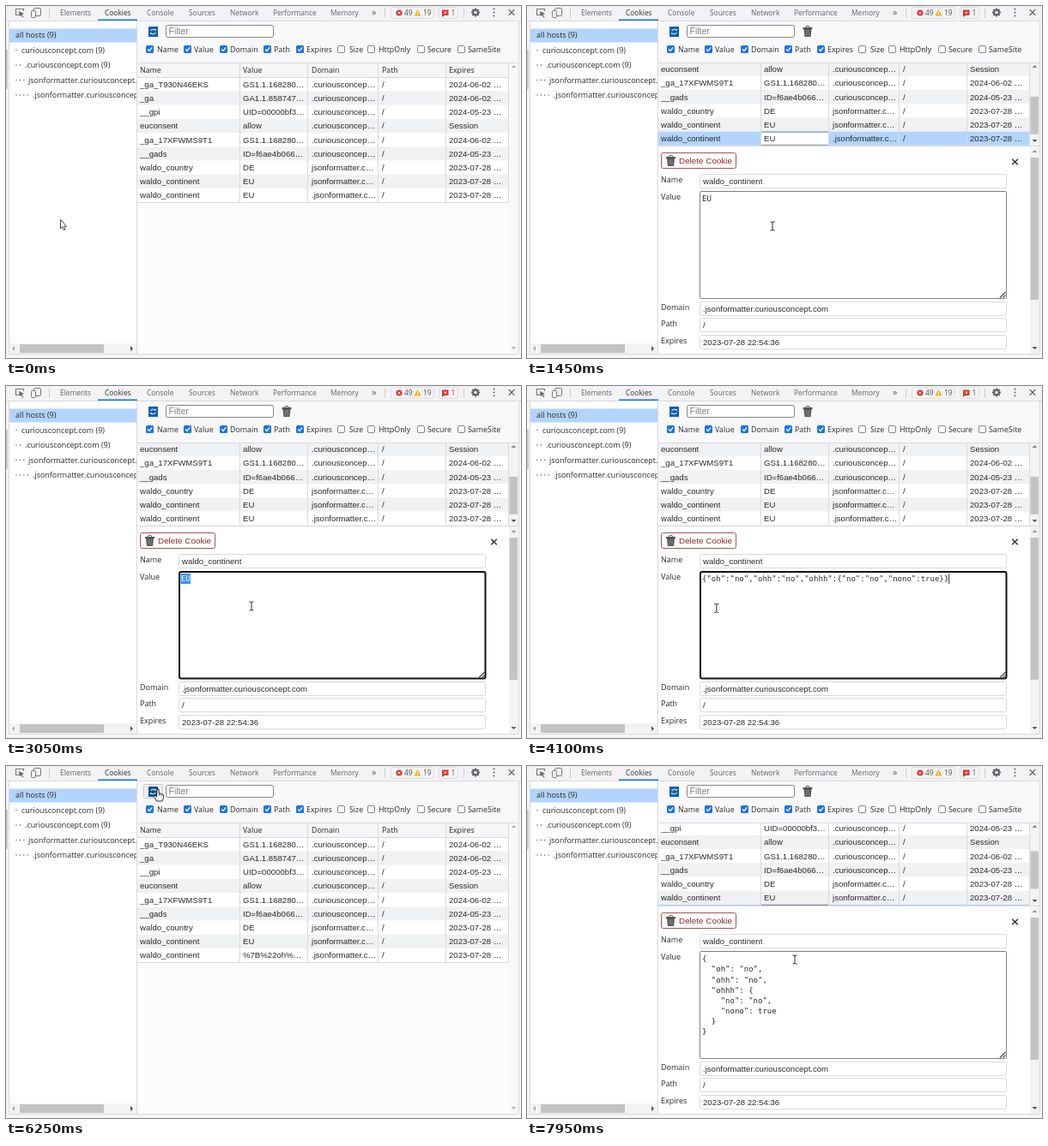
Animation of 600x411 px, one loop 8000 ms. Source, as an HTML page with a canvas:

```html
<!DOCTYPE html>
<html lang="en">
<head>
<meta charset="utf-8">
<title>Cookie editor</title>
<style>
html, body { margin: 0; width: 100%; height: 100%; overflow: hidden; background: #fff; }
canvas { display: block; width: 600px; height: 411px; }
</style>
</head>
<body>
<canvas id="stage"></canvas>
<script>
const canvas = document.getElementById('stage');
const ctx = canvas.getContext('2d');
const ratio = window.devicePixelRatio || 1;
canvas.width = 600 * ratio;
canvas.height = 411 * ratio;
ctx.scale(ratio, ratio);

const LOOP = 8000;
const UI = '"Open Sans", sans-serif';
const SANS = '"Liberation Sans", Arial, sans-serif';
const MONO = '"DejaVu Sans Mono", monospace';
const SELECTED = '#b3d4fc', BLUE = '#1a73e8', INK = '#2a2a2a', RULE = '#d8dade';
const ROW = 16.2, ROWS_TOP = 83.3, MAX_SCROLL = 66.3;
const COLUMNS = [156, 276, 356, 438, 516];
const HEADS = ['Name', 'Value', 'Domain', 'Path', 'Expires'];
const HOST = '.curiousconcep…', JSON_HOST = 'jsonformatter.c…';
const COOKIES = [
  ['_ga_T930N46EKS', 'GS1.1.168280…', HOST, '2024-06-02 …'],
  ['_ga', 'GA1.1.858747…', HOST, '2024-06-02 …'],
  ['__gpi', 'UID=00000bf3…', HOST, '2024-05-23 …'],
  ['euconsent', 'allow', HOST, 'Session'],
  ['_ga_17XFWMS9T1', 'GS1.1.168280…', HOST, '2024-06-02 …'],
  ['__gads', 'ID=f6ae4b066…', HOST, '2024-05-23 …'],
  ['waldo_country', 'DE', JSON_HOST, '2023-07-28 …'],
  ['waldo_continent', 'EU', JSON_HOST, '2023-07-28 …'],
  ['waldo_continent', 'EU', '.' + JSON_HOST, '2023-07-28 …']
];
const DATA = { oh: 'no', ohh: 'no', ohhh: { no: 'no', nono: true } };

// Moments of the story, in ms
const OPEN = 750, FOCUS = 1900, SELECT = 2700, PASTE = 3550, CLOSE = 4600, REOPEN = 7700;
const PATH = [
  [50, 63, 249], [700, 324, 226], [900, 324, 226], [1400, 286, 257], [3850, 286, 257],
  [4200, 205, 260], [4600, 107, 277], [4800, 107, 277], [5050, 128, 237],
  [5900, 172, 38], [6150, 177, 27], [6450, 177, 27], [7200, 295, 193], [7500, 312, 226]
];

const clamp = v => Math.max(0, Math.min(1, v));
const smooth = v => { v = clamp(v); return v * v * (3 - 2 * v); };

function pointer(t) {
  let from = PATH[0];
  for (const to of PATH) {
    if (t < to[0]) {
      const k = to[0] > from[0] ? smooth((t - from[0]) / (to[0] - from[0])) : 0;
      return [from[1] + (to[1] - from[1]) * k, from[2] + (to[2] - from[2]) * k];
    }
    from = to;
  }
  return [from[1], from[2]];
}

function fill(x, y, w, h, color) {
  ctx.fillStyle = color;
  ctx.fillRect(x, y, w, h);
}
function box(x, y, w, h, stroke, radius = 0, back, width = 1) {
  ctx.beginPath();
  ctx.roundRect(x, y, w, h, radius);
  if (back) { ctx.fillStyle = back; ctx.fill(); }
  if (stroke) { ctx.strokeStyle = stroke; ctx.lineWidth = width; ctx.stroke(); }
}
function line(points, color, width = 1) {
  ctx.beginPath();
  for (let i = 0; i < points.length; i += 2) ctx.lineTo(points[i], points[i + 1]);
  ctx.strokeStyle = color;
  ctx.lineWidth = width;
  ctx.stroke();
}
function shape(points, color, stroke) {
  ctx.beginPath();
  for (let i = 0; i < points.length; i += 2) ctx.lineTo(points[i], points[i + 1]);
  ctx.closePath();
  ctx.fillStyle = color;
  ctx.fill();
  if (stroke) { ctx.strokeStyle = stroke; ctx.lineWidth = 0.9; ctx.stroke(); }
}
function disc(x, y, r, color) {
  ctx.beginPath();
  ctx.arc(x, y, r, 0, 7);
  ctx.fillStyle = color;
  ctx.fill();
}
// y is the middle of the line of text
function text(str, x, y, size = 9, family = UI, color = INK) {
  ctx.font = `${size}px ${family}`;
  ctx.fillStyle = color;
  ctx.fillText(str, x, y + size * 0.36);
}
function clipped(x, y, w, h, draw) {
  ctx.save();
  ctx.beginPath();
  ctx.rect(x, y, w, h);
  ctx.clip();
  draw();
  ctx.restore();
}
function chevron(x, y, dx, dy, color) {
  shape([x + dx * 2, y + dy * 2, x - dx - dy * 3, y - dy - dx * 3, x - dx + dy * 3, y - dy + dx * 3], color);
}
function cross(x, y, r, width, color = INK) {
  line([x - r, y - r, x + r, y + r], color, width);
  line([x - r, y + r, x + r, y - r], color, width);
}

function trash(x, y) {
  box(x + 3.5, y + 0.5, 4, 2, '#555', 1);
  fill(x, y + 2, 11, 2, '#555');
  shape([x + 1, y + 4, x + 10, y + 4, x + 9, y + 13, x + 2, y + 13], '#555');
  for (const dx of [3.7, 5.5, 7.3]) line([x + dx, y + 5, x + dx, y + 12], '#999', 0.7);
}

function topBar() {
  fill(0, 0, 600, 17, '#f3f3f5');
  line([16, 10.5, 11.5, 10.5, 11.5, 3.5, 20.5, 3.5, 20.5, 6], '#777', 1.1);
  shape([15, 6, 21, 9, 18.5, 10, 20.5, 13, 19.5, 13.5, 17.5, 10.8, 16, 12], '#666');
  box(32.5, 2.5, 8, 9, '#777', 1);
  box(29.5, 5.5, 5, 8, '#777', 1, '#f3f3f5');
  line([50.5, 3, 50.5, 14], '#ccc');
  const tabs = [['Elements', 63], ['Cookies', 115], ['Console', 164], ['Sources', 213],
    ['Network', 261], ['Performance', 311], ['Memory', 378]];
  for (const [name, x] of tabs) text(name, x, 8, 8.4, UI, name === 'Cookies' ? '#333' : '#5f6368');
  text('»', 426, 7.5, 11, UI, '#555');
  line([441.5, 3, 441.5, 14], '#ccc');
  box(448.5, 1.5, 50, 13, '#dcdee2', 2);
  disc(458, 8, 3.6, '#e0352b');
  cross(458, 8, 1.4, 1, '#fff');
  text('49', 464, 8, 8.5, UI, '#555');
  shape([479.5, 4, 483.5, 11.5, 475.5, 11.5], '#f5b400');
  line([479.5, 6.5, 479.5, 10.3], '#fff');
  text('19', 486, 8, 8.5, UI, '#555');
  box(504.5, 1.5, 22, 13, '#dcdee2', 2);
  shape([508, 4.5, 515.5, 4.5, 515.5, 11, 511, 11, 508, 12.8], '#e0352b');
  cross(511.8, 7.7, 1.3, 1, '#fff');
  text('1', 518.5, 8, 8.5, UI, '#555');
  line([533.5, 3, 533.5, 14], '#ccc');
  for (let i = 0; i < 8; i++) {
    const a = i * Math.PI / 4;
    line([547, 7.5, 547 + 5 * Math.cos(a), 7.5 + 5 * Math.sin(a)], '#5f6368', 2);
  }
  disc(547, 7.5, 3.8, '#5f6368');
  disc(547, 7.5, 1.8, '#f3f3f5');
  for (const y of [3.5, 7.5, 11.5]) disc(568.5, y, 1, '#5f6368');
  cross(589, 7.5, 3.3, 1.1, '#555');
  line([0, 17.5, 600, 17.5], RULE);
  fill(107, 15.5, 46, 1.5, BLUE);
}

function sidebar() {
  fill(0, 18, 3, 393, '#f4f4f5');
  fill(0, 51, 2, 46, '#c8c8c8');
  fill(4, 26.5, 148, 16, SELECTED);
  clipped(4, 18, 148, 376, () => {
    text('all hosts (9)', 11, 34, 9);
    const hosts = ['curiousconcept.com (9)', '.curiousconcept.com (9)',
      'jsonformatter.curiousconcept.com (3)', '.jsonformatter.curiousconcept.com (1)'];
    hosts.forEach((host, i) => {
      const y = 51.5 + i * 17.5;
      for (let d = 0; d <= i; d++) disc(12 + d * 4.4, y, 0.7, '#555');
      text(host, [18, 22, 26, 31][i], y, 8.95);
    });
  });
  fill(4, 394, 148, 12, '#f3f3f4');
  fill(16, 395, 98, 10, '#c3c3c3');
  chevron(9, 400, -1, 0, '#aaa');
  chevron(146, 400, 1, 0, '#555');
  line([3.5, 18, 3.5, 406], RULE);
  line([152.5, 18, 152.5, 406], RULE);
}

function checkbox(x, on) {
  if (!on) return box(x + 0.5, 46.5, 8, 8, '#888', 1.5, '#fff');
  box(x, 46, 9, 9, null, 1.5, BLUE);
  line([x + 2, 50.5, x + 4, 52.5, x + 7.2, 48.3], '#fff', 1.3);
}

function filterBar(hover, canDelete) {
  fill(153, 18, 444, 48, '#f8f8fa');
  if (hover) box(160.5, 21.5, 22, 16, '#c8c8c8', 1, '#f2f2f3');
  fill(166, 24, 11, 12, hover ? '#0b4f8c' : '#0f5fae');
  ctx.strokeStyle = '#d6e9fa';
  ctx.lineWidth = 1.1;
  for (const start of [0.3, Math.PI + 0.3]) {
    ctx.beginPath();
    ctx.arc(171.5, 30, 2.8, start, start + 2.3);
    ctx.stroke();
  }
  shape([172.7, 27, 175, 27, 174.7, 29.2], '#d6e9fa');
  shape([170.3, 33, 168, 33, 168.3, 30.8], '#d6e9fa');
  box(186.5, 22.5, 125, 14, '#858585', 2, '#fff');
  text('Filter', 189.5, 29.5, 10.5, SANS, '#808080');
  if (canDelete) trash(321.5, 23);
  const boxes = [['Name', 163, 176], ['Value', 207, 219], ['Domain', 249, 261], ['Path', 300, 312],
    ['Expires', 338, 350], ['Size', 386, 400], ['HttpOnly', 421, 434], ['Secure', 479, 491], ['SameSite', 526, 538]];
  boxes.forEach(([name, x, labelX], i) => {
    checkbox(x, i < 5);
    text(name, labelX, 50.5, 8.9);
  });
}

function grid(s) {
  const height = s.open ? 97 : 340;
  clipped(153, 66, 444, height, () => {
    fill(153, 66, 444, height, '#fcfcfd');
    ctx.save();
    ctx.translate(0, -s.scroll);
    fill(153, 66, 432, 17, '#f5f5f7');
    HEADS.forEach((head, i) => text(head, COLUMNS[i], 75, 8.8));
    COOKIES.forEach(([name, value, domain, expires], i) => {
      const top = ROWS_TOP + i * ROW, last = i === 8, y = top + ROW / 2;
      const picked = last && s.picked;
      fill(153, top, 432, ROW, picked ? SELECTED : i % 2 ? '#f0f1f3' : '#fff');
      if (picked) box(272.5, top + 0.5, 79, ROW - 1, '#777', 0, '#fff');
      const cells = [name, last && s.saved ? '%7B%22oh%…' : value, domain, '/', expires];
      cells.forEach((cell, c) => text(cell, COLUMNS[c], y, 9.6, SANS));
    });
    for (const x of [272.5, 351.5, 433.5, 512.5, 585.5]) line([x, 66, x, 229], RULE);
    line([153, 83.5, 585, 83.5], RULE);
    line([153, 229.5, 585, 229.5], RULE);
    ctx.restore();
    fill(586, 66, 11, height, s.open ? '#f3f3f4' : '#f9f9fa');
    const arrow = s.open ? '#888' : '#b4b4b4';
    chevron(591.5, 71, 0, -1, arrow);
    chevron(591.5, s.open ? 157 : 399, 0, 1, s.open ? '#555' : arrow);
    if (s.open) fill(586.5, 78 + s.scroll * 0.42, 9.5, 44, '#c3c3c3');
  });
  line([153, 66.5, 597, 66.5], RULE);
}

function field(label, value, top) {
  text(label, 156, top + 7);
  box(201.5, top + 0.5, 357, 16, '#dadada', 2, '#fff');
  text(value, 205, top + 9, 9.6, SANS);
}

function details(s) {
  fill(153, 163, 444, 243, '#fff');
  line([153, 163.5, 597, 163.5], RULE);
  box(156.5, 171.5, 87, 18, '#a0565b', 2, '#fff');
  trash(162, 174);
  text('Delete Cookie', 177, 180.5, 9.9, SANS, '#8b2a32');
  cross(568.5, 182, 3.3, 1.3);
  field('Name', 'waldo_continent', 196);
  field('Domain', '.jsonformatter.curiousconcept.com', 345);
  field('Path', '/', 364);
  field('Expires', '2023-07-28 22:54:36', 384);
  text('Value', 156, 223);
  if (s.focused) box(202, 217, 356.5, 124.5, '#111', 2, '#fff', 2);
  else box(201.5, 216.5, 357, 125, '#808080', 1, '#fff');
  line([551, 340.5, 557.5, 334], '#444', 1.1);
  line([554.5, 340.5, 557.5, 337.5], '#444', 1.1);
  if (s.marked) fill(203.5, 219, 11.5, 12, '#3390ff');
  s.value.split('\n').forEach((row, i) =>
    text(row, 204, 225 + i * 12.15, 9, MONO, s.marked ? '#fff' : INK));
  if (s.focused && !s.marked && s.blink) {
    const x = 204.5 + ctx.measureText(s.value).width;
    line([x, 219, x, 231], '#000', 0.8);
  }
  fill(586, 164, 11, 242, '#f3f3f4');
  fill(586.5, 177, 9.5, 166, '#c3c3c3');
  chevron(591.5, 170, 0, -1, '#999');
  chevron(591.5, 399, 0, 1, '#555');
}

function cursor(x, y, kind) {
  ctx.save();
  ctx.translate(x, y);
  if (kind === 'beam') {
    line([-2.5, -5, -0.8, -5, 0, -4, 0.8, -5, 2.5, -5], INK);
    line([-2.5, 5, -0.8, 5, 0, 4, 0.8, 5, 2.5, 5], INK);
    line([0, -4.5, 0, 4.5], INK);
  } else if (kind === 'hand') {
    shape([-1, 0, 1, 0, 1.3, 5, 3.2, 5, 5, 6, 6.5, 7, 6.5, 10.5, 5, 14, -1.5, 14, -3, 11,
      -5.2, 8, -4.2, 7, -1.5, 9], '#fff', '#111');
    line([1.3, 5, 1.3, 8], '#111', 0.7);
    line([3.8, 6, 3.8, 8.5], '#111', 0.7);
  } else {
    shape([0.5, 0.5, 0.5, 11, 2.8, 8.8, 4.4, 12.6, 6, 11.9, 4.5, 8.2, 7.5, 8.2], '#fff', '#333');
  }
  ctx.restore();
}

function stateAt(t) {
  const again = t >= REOPEN;
  const open = again || (t >= OPEN && t < CLOSE);
  const [x, y] = pointer(t);
  const overText = open && x > 201 && x < 559 && y > 216 && y < 342;
  const hover = t > 5900 && x > 160 && x < 183 && y < 37;
  const scrollStart = again ? 7820 : 870;
  return {
    x, y, open, hover,
    kind: overText ? 'beam' : hover ? 'hand' : 'arrow',
    scroll: open ? MAX_SCROLL * smooth((t - scrollStart) / 190) : 0,
    picked: again || (t >= OPEN && t < FOCUS),
    focused: t >= FOCUS && t < CLOSE,
    marked: t >= SELECT && t < PASTE,
    saved: t >= CLOSE,
    blink: (t - FOCUS) % 1000 < 500,
    value: again ? JSON.stringify(DATA, null, 2) : t >= PASTE ? JSON.stringify(DATA) : 'EU'
  };
}

function draw(t) {
  const s = stateAt(t);
  fill(0, 0, 600, 411, '#fff');
  topBar();
  sidebar();
  filterBar(s.hover, s.open);
  grid(s);
  if (s.open) details(s);
  fill(0, 406, 600, 5, '#f6f6f7');
  line([3, 406.5, 597, 406.5], RULE);
  fill(597, 18, 3, 388, '#f6f6f7');
  line([597.5, 18, 597.5, 406], RULE);
  cursor(s.x, s.y, s.kind);
}

const start = performance.now();
function tick() {
  draw((performance.now() - start) % LOOP);
  requestAnimationFrame(tick);
}
tick();
</script>
</body>
</html>
```
